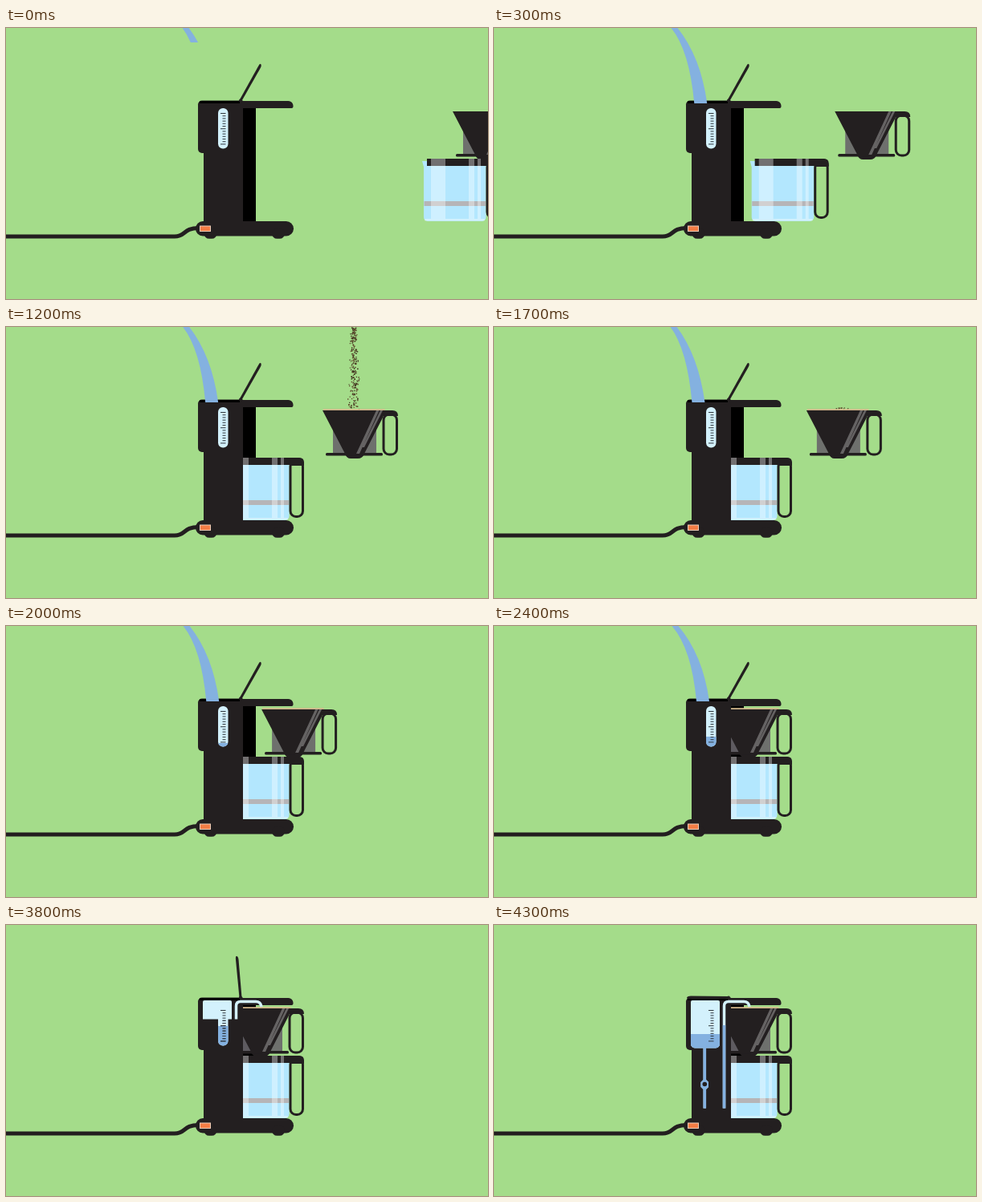
These frames come from a looping animation (600x338 px, 4.4 s). An HTML page with a canvas:

```html
<!DOCTYPE html>
<html lang="en">
<head>
<meta charset="utf-8">
<title>Coffee maker</title>
<style>
  html, body { margin: 0; width: 100%; height: 100%; overflow: hidden; background: #a4dc8a; }
  canvas { display: block; width: 600px; height: 338px; }
</style>
</head>
<body>
<canvas id="stage" width="600" height="338"></canvas>
<script>
const ctx = document.getElementById('stage').getContext('2d');
const LOOP = 4400, STEP = 100;
const DARK = '#231f20', GREEN = '#a4dc8a', WATER = '#84b1e0', PALE = '#d3f1fc', GLASS = '#b3e7fe';

const clamp = v => Math.max(0, Math.min(1, v));
const progress = (t, from, to) => clamp((t - from) / (to - from));
const lerp = (a, b, p) => a + (b - a) * p;
const easeOut = p => 1 - (1 - p) ** 3;
const easeInOut = p => p < .5 ? 4 * p ** 3 : 1 - 4 * (1 - p) ** 3;

function random(seed) {
  return () => {
    seed = (seed * 1664525 + 1013904223) % 4294967296;
    return seed / 4294967296;
  };
}

function box(color, x, y, w, h, radius = 0) {
  ctx.fillStyle = color;
  ctx.beginPath();
  ctx.roundRect(x, y, w, h, radius);
  ctx.fill();
}

function shape(color, path) {
  ctx.fillStyle = color;
  ctx.fill(new Path2D(path));
}

function line(color, width, path, cap = 'butt') {
  ctx.strokeStyle = color;
  ctx.lineWidth = width;
  ctx.lineCap = cap;
  ctx.lineJoin = 'round';
  ctx.stroke(new Path2D(path));
}

function layer(draw, dx = 0, dy = 0) {
  ctx.save();
  ctx.translate(dx, dy);
  draw();
  ctx.restore();
}

function clipped(x, y, w, h, draw, radius = 0) {
  layer(() => {
    ctx.beginPath();
    ctx.roundRect(x, y, w, h, radius);
    ctx.clip();
    draw();
  });
}

const rand = random(11);
const grounds = Array.from({ length: 720 }, () => ({
  birth: 340 + 1020 * rand(),
  side: rand() + rand() - 1,
  size: 1 + .6 * rand(),
  color: rand() < .6 ? '#3d2c1c' : '#5f4a2c'
}));

function drawGrounds(t) {
  for (const g of grounds) {
    const age = (t - g.birth) / 1000;
    if (age < 0) continue;
    const y = -4 + 190 * age + 340 * age * age;
    if (y > 108) continue;
    box(g.color, 432.5 + g.side * (4 + y * .045), y, g.size, g.size);
  }
}

function drawPaper() {
  shape('#d3b78c', 'M394.500 0H472L446 50H420Z');
}

function drawHolder() {
  box('rgba(105,101,107,.9)', 407, 120, 54, 38);
  shape(DARK, 'M394 104H481Q488 104 488 111H470L446 158Q444 164 438 164H429Q424 164 422 158Z');
  box(DARK, 398, 157, 71, 3.5, 1.5);
  ctx.strokeStyle = DARK;
  ctx.lineWidth = 3;
  ctx.beginPath();
  ctx.roundRect(470, 109, 16.5, 50, 7);
  ctx.stroke();
  shape('rgba(255,255,255,.3)', 'M461 104H464.500L440 158H436ZM466 104H469L446 150H443.500Z');
}

function drawCarafe() {
  box(GLASS, 275, 170, 77.500, 71, [0, 0, 5, 5]);
  shape(GLASS, 'M273 166H281V173H275Z');
  box('#b6b5b7', 275.500, 216, 76.500, 6);
  box('rgba(255,255,255,.4)', 276, 238, 75, 2.5, 1);
  shape(DARK, 'M279 163H365Q371 163 371 169V172H279Z');
  ctx.strokeStyle = DARK;
  ctx.lineWidth = 3;
  ctx.beginPath();
  ctx.roundRect(354, 167, 15.500, 69.500, 7);
  ctx.stroke();
  shape(DARK, 'M354 163H364Q371 163 371 173H354Z');
  ctx.fillStyle = 'rgba(255,255,255,.36)';
  for (const [x, w] of [[284, 18], [331, 7], [342, 4]]) ctx.fillRect(x, 163, w, 75);
}

function drawBack() {
  line(DARK, 5, 'M0 260H210C224 260 220 249.500 240 249.500');
  box('#000', 295, 98, 16, 144);
}

function drawMachine() {
  box(DARK, 239, 90.500, 56, 65.500, [5, 0, 0, 5]);
  box(DARK, 246, 100, 49, 150);
  box(DARK, 236, 241, 30, 18.500, 9);
  box(DARK, 246, 241, 112, 18.500, [0, 9.25, 9.25, 9.25]);
  for (const x of [254.500, 339]) box(DARK, x - 8, 250, 16, 12.800, 7);
  box(DARK, 288, 91, 69.500, 9, [0, 6, 2, 0]);
  box('#000', 241, 91, 50, 3);
  box('#edcdb8', 241, 246.500, 14, 7.500);
  box('#f37c45', 242, 247.500, 12, 5.500);
}

function drawTicks() {
  for (let i = 0; i < 13; i++) {
    const w = i % 6 ? 4 : 6.500;
    box('#30383f', 273.500 - w, 106 + i * 3.200, w, 1);
  }
}

function drawGauge(level) {
  clipped(264, 100, 12.500, 50.500, () => {
    box(PALE, 264, 100, 13, 51);
    box(WATER, 264, level, 13, 151 - level);
  }, 6);
  drawTicks();
}

// Cutaway view: reservoir, downpipe with valve, riser to the spout
function drawInside(t, level) {
  const down = lerp(150, 229, progress(t, 3800, 4300));
  const up = t >= 4300 ? 125 : 229;
  const riser = 'M286.500 228.500V101Q286.500 95.500 292 95.500H311Q317 95.500 318 102';
  const pipes = color => {
    line(color, 3.5, 'M262.300 150V228.500');
    shape(color, 'M260.500 193H264L267 196V202L264 205H260.500L257.500 202V196Z');
  };
  clipped(239, 90, 82, lerp(4, 145, progress(t, 3700, 4300)), () => {
    const tank = [2, 2, 5, 5];
    box(PALE, 245, 94, 36, 59.500, tank);
    pipes(PALE);
    line(PALE, 3.5, riser);
    clipped(245, level, 36, 155 - level, () => box(WATER, 245, 94, 36, 59.500, tank));
    clipped(255, 150, 15, down - 150, () => pipes(WATER));
    clipped(282, up, 8, 230 - up, () => line(WATER, 3.5, riser));
    ctx.fillStyle = DARK;
    ctx.beginPath();
    ctx.arc(262.300, 198.500, 2.800, 0, 7);
    ctx.fill();
  });
  drawTicks();
}

function drawLid(angle) {
  layer(() => {
    ctx.rotate(angle);
    shape(DARK, 'M0 -1.500H49Q52 -1.500 52 0Q51 2 47 2L0 1.500Z');
    box(DARK, -2, -2, 4, 4, 2);
  }, 292, 90.500);
}

function drawStream(t) {
  const sway = Math.cos((t - 700) / 1700 * 2 * Math.PI);
  const s = t / 1000;
  const head = Math.min(94, 18 + 350 * s + 500 * s * s);
  const since = Math.max(0, t - 3250) / 1000;
  const tail = 200 * since + 500 * since * since;
  if (tail >= head) return;
  const top = 220.500 + sway, end = 249 + 3 * sway;
  clipped(200, tail, 90, head - tail, () => shape(WATER,
    `M${top} 0Q${end - 6} 28 ${end} 94H${end + 16}Q${end + 8} 36 ${top + 8} 0Z`));
}

function waterLevel(t) {
  if (t >= 4300) return 136;
  if (t < 2400) return lerp(151, 138, progress(t, 1750, 2400));
  return lerp(138, 126, progress(t, 2400, 3600));
}

function render(t) {
  const arrive = 1 - easeOut(progress(t, 0, 700));
  const dock = -117 * easeInOut(progress(t, 1500, 2400));
  const paperY = lerp(-28, 102.300, easeInOut(progress(t, 300, 900)));
  const level = waterLevel(t);

  box(GREEN, 0, 0, 600, 338);
  drawBack();
  drawGrounds(t);
  if (t > 300) layer(drawPaper, dock, paperY);
  layer(drawHolder, 162 * arrive + dock);
  layer(drawCarafe, 245 * arrive);
  drawMachine();
  drawGauge(level);
  if (t >= 3700) drawInside(t, level);
  drawStream(t);
  drawLid(lerp(-61, -180, easeInOut(progress(t, 3550, 4150))) * Math.PI / 180);
}

const start = performance.now();
function tick() {
  const t = (performance.now() - start) % LOOP;
  render(Math.floor(t / STEP) * STEP);
  requestAnimationFrame(tick);
}
tick();
</script>
</body>
</html>
```
